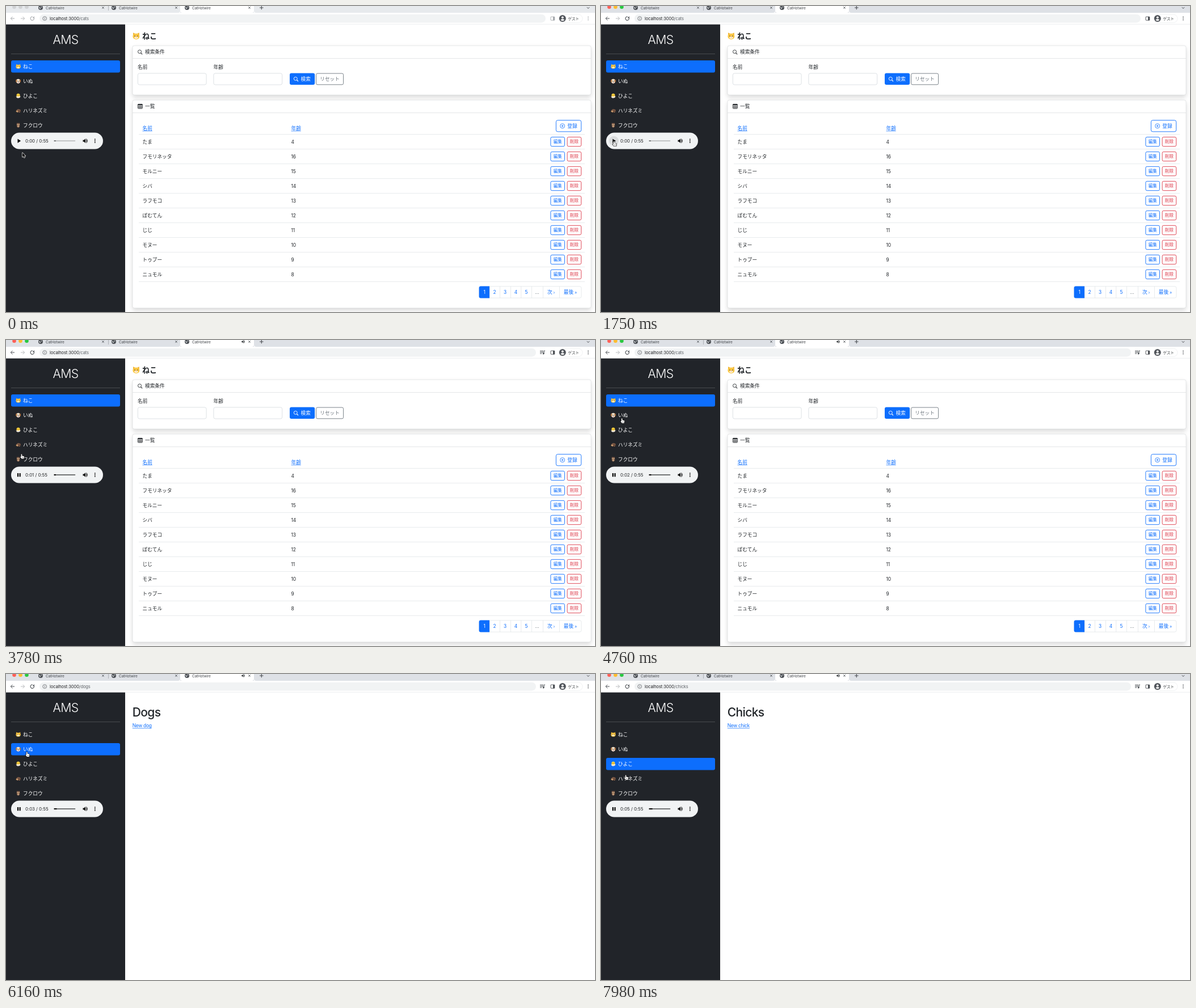
Recreate the animation shown at these times as an HTML page with a canvas. Size 1038 by 540 pixels, loop 8000 ms.

```html
<!DOCTYPE html>
<html lang="ja">
<head>
<meta charset="utf-8">
<title>AMS</title>
<style>
html, body { margin: 0; width: 100%; height: 100%; overflow: hidden; background: #fff; }
canvas { display: block; width: 1038px; height: 540px; }
</style>
</head>
<body>
<canvas id="stage"></canvas>
<script>
const W = 1038, H = 540, LOOP = 8000;
const canvas = document.getElementById('stage');
const ratio = window.devicePixelRatio || 1;
canvas.width = W * ratio;
canvas.height = H * ratio;
const c = canvas.getContext('2d');

const LATIN = 'Inter, "Noto Sans CJK JP", "Noto Sans CJK", sans-serif';
const KANA = '"Noto Sans CJK JP", "Noto Sans CJK", sans-serif';
const BLUE = '#0d6efd', RED = '#dc3545', GREY = '#6c757d', INK = '#212529', LINE = '#dee2e6';
const SIDE = '#212429', ICON = '#5f6368';
const REM = 8.64;

const MENU = ['ねこ', 'いぬ', 'ひよこ', 'ハリネズミ', 'フクロウ'];
const CATS = [
  ['たま', 4], ['フモリネッタ', 16], ['モルニー', 15], ['シバ', 14], ['ラフモコ', 13],
  ['ぽむてん', 12], ['じじ', 11], ['モヌー', 10], ['トゥプー', 9], ['ニュモル', 8]
];
const PAGES = [[834, '1'], [852, '2'], [870, '3'], [889, '4'], [907.5, '5'], [926, '…'], [946, '次 ›'], [975, '最後 »'], [1014]];

// time, x, y of the pointer
const PATH = [
  [0, 29, 259], [280, 29, 259], [560, 32, 260], [1050, 24, 243], [2900, 24, 243], [3010, 23.7, 238.7],
  [3460, 23.7, 238.7], [4270, 38, 142.5], [5180, 38, 142.5], [5390, 38, 141.7], [6400, 38, 141.7],
  [6720, 40, 160.3], [7440, 40, 160.3], [7770, 44.4, 182.5], [7860, 44.4, 182.5], [7980, 44.8, 182.5]
];
const ARROW = new Path2D('M0 0V7.6L1.8 6 3 8.8 4.3 8.2 3.1 5.6H5.5Z');
const HAND = new Path2D('M-2 .7V-3.4a.8 .8 0 0 1 1.6 0V-.9L2.6 -.4Q3.6 0 3.4 1.2L2.8 4.2H-1.2L-3.3 1.3Q-3.3 .1 -2 .7Z');

const clamp = (v, a = 0, b = 1) => Math.min(b, Math.max(a, v));
const ramp = (t, a, b) => clamp((t - a) / (b - a));

function text(s, x, y, size, color, o = {}) {
  const latin = /^[\x20-\x7e]+$/.test(s);
  const px = latin && !o.exact ? size * 0.97 : size;
  c.font = `${o.weight || 400} ${px}px ${latin ? LATIN : KANA}`;
  c.letterSpacing = `${px * (o.track ?? (latin ? -0.03 : 0))}px`;
  c.textAlign = o.align || 'left';
  c.fillStyle = color;
  c.fillText(s, x, y);
  return c.measureText(s).width;
}

function link(s, x, y, size = REM) {
  const w = text(s, x, y, size, BLUE);
  rect(x, y + 1.3, w, 0.7, BLUE);
}

function rect(x, y, w, h, color) {
  c.fillStyle = color;
  c.fillRect(x, y, w, h);
}

function box(x, y, w, h, r, fill, stroke, width = 0.7) {
  c.beginPath();
  c.roundRect(x, y, w, h, r);
  if (fill) { c.fillStyle = fill; c.fill(); }
  if (stroke) { c.strokeStyle = stroke; c.lineWidth = width; c.stroke(); }
}

function oval(x, y, rx, ry, fill, stroke, width = 1) {
  c.beginPath();
  c.ellipse(x, y, rx, ry, 0, 0, Math.PI * 2);
  if (fill) { c.fillStyle = fill; c.fill(); }
  if (stroke) { c.strokeStyle = stroke; c.lineWidth = width; c.stroke(); }
}
const dot = (x, y, r, fill, stroke, width) => oval(x, y, r, r, fill, stroke, width);

function path(d, x, y, stroke, width, fill, scale = 1) {
  const p = typeof d === 'string' ? new Path2D(d) : d;
  c.save();
  c.translate(x, y);
  c.scale(scale, scale);
  c.lineJoin = 'round';
  if (stroke) { c.strokeStyle = stroke; c.lineWidth = width; c.stroke(p); }
  if (fill) { c.fillStyle = fill; c.fill(p); }
  c.restore();
}

function dots(x, y, gap, r, color) {
  for (let i = -1; i < 2; i++) dot(x, y + i * gap, r, color);
}

function lens(x, y, color) {
  dot(x - 0.7, y - 0.7, 3, null, color, 0.9);
  path('M1.5 1.5L4 4', x, y, color, 1.1);
}

function speaker(x, y, color, s) {
  path('M-4 -1.4H-2L.6 -4V4L-2 1.4H-4Z', x, y, null, 0, color, s);
  path('M1.8 -1.9Q3.3 0 1.8 1.9M2 -3.7Q5.7 0 2 3.7', x, y, color, 1, null, s);
}

// small animal faces, drawn 9 units wide
const ANIMALS = [
  () => {
    path('M-4 .2L-3.8 -4.2 -1.5 -3 1.5 -3 3.8 -4.2 4 .2Z', 0, 0, null, 0, '#f2b632');
    oval(0, 0.6, 4.3, 3.6, '#fbc846');
    oval(0, 2, 2.2, 1.5, '#fff0cd');
    eyes(1.8, 0, 0.55);
    dot(0, 1.2, 0.5, '#d9737a');
  },
  () => {
    oval(0, 0, 3.7, 4.1, '#f3e3cb');
    oval(-3.5, -0.5, 1.1, 2.8, '#b87640');
    oval(3.5, -0.5, 1.1, 2.8, '#b87640');
    oval(0, 2.4, 1.9, 1.6, '#fff8ec');
    eyes(1.5, -0.5, 0.55);
    oval(0, 1.4, 0.9, 0.65, '#2a211d');
    oval(0, 3.2, 0.6, 0.7, '#e45f66');
  },
  () => {
    dot(0, -1, 3.2, '#ffd43c');
    path('M-4.2 .4L-2.5 1.5 -1 .4 .6 1.5 2.2 .4 4.2 .8Q3.6 4.2 0 4.2T-4.2 .4Z', 0, 0, null, 0, '#f2e9d9');
    eyes(1.3, -1.4, 0.45);
    oval(0, -0.5, 0.9, 0.5, '#f18a24');
  },
  () => {
    oval(0.5, 0.3, 4, 3, '#67493a');
    for (let i = 0; i < 7; i++) path('M-.6 0L.5 -2 .8 0Z', -1.8 + i * 0.85, -1.5 + Math.abs(i - 2) * 0.4, null, 0, '#82604b');
    oval(-2.2, 1.3, 2.2, 1.4, '#d6a676');
    dot(-4.2, 1.2, 0.5, '#211916');
    dot(-2.5, 0.8, 0.4, '#211916');
    rect(-2, 2.7, 1.3, 0.8, '#c09068');
    rect(1.8, 2.7, 1.3, 0.8, '#c09068');
  },
  () => {
    oval(0, 0, 3, 4.2, '#765443');
    path('M-3 -2.3L-2.5 -4.5 0 -3.4 2.5 -4.5 3 -2.3Z', 0, 0, null, 0, '#765443');
    oval(0, 1.7, 1.8, 2.2, '#b99779');
    dot(-1.3, -1.6, 1.15, '#e6c5a0');
    dot(1.3, -1.6, 1.15, '#e6c5a0');
    eyes(1.2, -1.6, 0.5);
    path('M-.5 -1L.5 -1 0 .2Z', 0, 0, null, 0, '#e9a236');
  }
];
function eyes(dx, y, r) {
  dot(-dx, y, r, '#35291f');
  dot(dx, y, r, '#35291f');
}
function animal(i, x, y, s = 1) {
  c.save();
  c.translate(x, y);
  c.scale(s, s);
  ANIMALS[i]();
  c.restore();
}

function tab(x, active) {
  if (active) {
    box(x - 10, -8, 130, 20, 4, '#fff');
    path('M-4 0Q0 0 0 -4L0 0ZM134 0Q130 0 130 -4V0Z', x - 10, 12, null, 0, '#fff');
  }
  dot(x + 2, 3, 4, '#4d5156');
  path('M-3 -1.4Q-1 -.2 0 .2L-.6 2.6Q-2.6 2 -3 -1.4ZM.4 -2.6L2.3 -1.6 1.8 .4Z', x + 2, 3, null, 0, '#d5d8dc');
  text('CatHotwire', x + 11, 5.5, 6.7, '#45494d');
  path('M-1.8 -1.8L1.8 1.8M1.8 -1.8L-1.8 1.8', x + 112, 3, '#45494d', 0.8);
}

function browser(t) {
  const focused = t >= 1400, playing = t >= 2240;
  rect(0, 0, W, 12, focused ? '#dee1e6' : '#e7eaed');
  const lights = focused ? ['#fe5f57', '#febc2e', '#28c840'] : ['#d0d2d4', '#d0d2d4', '#d0d2d4'];
  lights.forEach((color, i) => dot(14.5 + i * 11, 1.8, 3.3, color));
  rect(0, 12, W, 20, '#fff');
  tab(59); tab(188); tab(317, true);
  rect(180, -1, 0.7, 9, '#9a9da2');
  c.globalAlpha = ramp(t, 2870, 3290);
  speaker(418, 3, '#3c4043', 0.7);
  c.globalAlpha = 1;
  path('M-3.3 0H3.3M0 -3.3V3.3', 450.3, 3, '#45494d', 1.1);
  path('M-2.2 -1.1L0 1.1 2.2 -1.1', 1026, 3.3, '#45494d', 1);

  const ink = focused ? '#4b4f54' : '#a7aaae';
  const arrow = 'M3.5 0H-3.2M0 -3.2L-3.2 0 0 3.2';
  path(arrow, 11.5, 22, ink, 1);
  c.save();
  c.translate(29.5, 22); c.scale(-1, 1);
  path(arrow, 0, 0, '#b8babd', 1);
  c.restore();
  c.beginPath();
  c.arc(46.3, 22, 3.2, -0.6, 4.9);
  c.strokeStyle = ink; c.lineWidth = 1.1; c.stroke();
  path('M3.5 -4V-.7H.2Z', 46.3, 22, null, 0, ink);

  box(59, 14.7, (playing ? 934 : 951) - 59, 14.8, 7.4, '#f1f3f4');
  dot(68.2, 22, 3.4, null, ICON, 0.8);
  rect(67.8, 21.4, 0.8, 2.4, ICON);
  rect(67.8, 20, 0.8, 0.8, ICON);
  const page = t < 6020 ? '/cats' : t < 7140 ? '/dogs' : '/chicks';
  const host = text('localhost:3000', 77, 24.8, 7.5, '#202124', { exact: 1, track: -0.012 });
  text(page, 77 + host, 24.8, 7.5, ICON, { exact: 1, track: -0.012 });

  if (playing) {
    path('M-4.5 -2.7H1.5M-4.5 -.4H1.5M-4.5 1.9H-1M2.6 2V-2.9H4.6', 945.5, 22, '#4b4f54', 1);
    dot(947.2, 24, 1.4, '#4b4f54');
  }
  box(960, 19, 6.8, 6.2, 0.7, null, ink, 0.9);
  rect(964, 19, 3, 6.2, ink);
  box(974, 15, 42, 14.3, 7.2, '#fff', '#e6e8ea', 0.6);
  dot(980.8, 22, 6, '#50545a');
  dot(980.8, 20.2, 1.9, '#fff');
  path('M-3.4 2.4Q0 -.8 3.4 2.4 2 4.2 0 4.2T-3.4 2.4Z', 980.8, 22, null, 0, '#fff');
  text('ゲスト', 990.5, 24.6, 6.5, '#3c4043');
  dots(1026, 22, 2.6, 0.8, ink);
  rect(0, 31.8, W, 0.6, '#dfe1e4');
}

function audio(t) {
  const playing = t >= 2240;
  box(9, 223.5, 162, 29, 14.5, '#f1f3f4');
  const hover = ramp(t, 1080, 1260) * (1 - ramp(t, 3500, 3640));
  if (hover) dot(22.5, 238, 8.6 * hover, `rgba(0,0,0,${0.09 * hover})`);
  if (playing) {
    rect(20, 235, 2.1, 6.3, '#000');
    rect(23.6, 235, 2.1, 6.3, '#000');
  } else path('M-2.3 -3.6L3.3 0 -2.3 3.6Z', 22.8, 238.1, null, 0, '#000');

  const sec = Math.max(0, (t - 2760) / 990);
  text(`0:0${Math.floor(sec)} / 0:55`, 34, 241, 7.9, '#26282a', { exact: 1, track: -0.005 });
  box(84.5, 237.1, 37.8, 1.9, 1, '#c2c4c5');
  box(84.5, 237.1, t < 3290 ? 3.5 : 37.8, 1.9, 1, '#727475');
  if (playing) box(84.5, 237.1, 2.8 + sec * 0.68, 1.9, 1, '#000');
  speaker(139.5, 238, '#111', 1);
  dots(156.8, 238, 2.8, 0.95, '#111');
}

function sidebar(t, active) {
  rect(0, 32.3, 210, H, SIDE);
  text('AMS', 105, 67, 21.9, '#fff', { weight: 300, align: 'center' });
  rect(9, 84.3, 192, 0.7, '#5a5d61');
  box(9, 96 + active * 26, 192, 21.5, 3, BLUE);
  MENU.forEach((name, i) => {
    const y = 106.6 + i * 26;
    animal(i, 21.6, y, 0.95);
    text(name, 30, y + 3.2, REM, '#fff');
  });
  audio(t);
}

function card(y, h, title) {
  c.save();
  c.shadowColor = 'rgba(0,0,0,.15)';
  c.shadowBlur = 8.6 * ratio;
  c.shadowOffsetY = 4.3 * ratio;
  box(223, y, 808, h, 3.2, '#fff');
  c.restore();
  box(223, y, 808, h, 3.2, null, '#d5d7d9', 0.6);
  rect(223, y + 22, 808, 0.7, '#d9dbdd');
  text(title, 245, y + 14.4, REM, INK);
}

function button(s, x, y, w, h, color, size = REM, fill) {
  box(x, y, w, h, 2.4, fill, color, 0.9);
  text(s, x + w / 2, y + h / 2 + size * 0.37, size, fill ? '#fff' : color, { align: 'center' });
}

function catPage() {
  animal(0, 229.4, 53, 1.4);
  text('ねこ', 240, 57.8, 13.1, INK, { weight: 700 });

  card(70, 87, '検索条件');
  lens(236.2, 81.3, INK);
  [['名前', 232], ['年齢', 365.6]].forEach(([name, x]) => {
    text(name, x, 110.8, REM, INK);
    box(x + 0.3, 118.8, 120.8, 20.2, 3, '#fff', '#ced4da');
  });
  box(500, 118.6, 44.2, 20.5, 3, BLUE);
  lens(511, 129, '#fff');
  text('検索', 519.5, 132.2, REM, '#fff');
  button('リセット', 546.6, 119, 48, 19.8, GREY);

  card(166, 367, '一覧');
  box(232.4, 173.2, 8, 7.8, 1, null, INK, 0.8);
  rect(232.4, 173.2, 8, 2, INK);
  path('M-4 .5H4M-4 2.3H4M-1.4 -2V4M1.4 -2V4', 236.4, 177, INK, 0.7);

  link('名前', 240.5, 218.7);
  link('年齢', 502.5, 218.7);
  box(969.4, 201.6, 44.3, 20.2, 3, null, BLUE, 0.9);
  dot(980.6, 211.7, 4, null, BLUE, 0.8);
  path('M-2 0H2M0 -2V2', 980.6, 211.7, BLUE, 0.8);
  text('登録', 989.3, 214.9, REM, BLUE);

  rect(234, 226, 786, 0.7, LINE);
  CATS.forEach(([name, age], i) => {
    const y = 239.5 + i * 26;
    text(name, 240.5, y + 3.2, REM, INK);
    text(String(age), 502.5, y + 3.1, REM, INK);
    button('編集', 959.9, y - 8.2, 24.6, 16.4, BLUE, 7.56);
    button('削除', 989.1, y - 8.2, 24.6, 16.4, RED, 7.56);
    rect(234, y + 12.6, 786, 0.7, LINE);
  });

  box(834, 494.8, 180, 20.4, 3, '#fff', LINE);
  PAGES.slice(0, -1).forEach(([x, s], i) => {
    const end = PAGES[i + 1][0];
    if (i) rect(x, 494.8, 0.7, 20.4, LINE);
    else box(x - 0.4, 494.5, end - x + 0.4, 21, [3, 0, 0, 3], BLUE);
    const color = i === 0 ? '#fff' : i === 5 ? GREY : BLUE;
    if (i === 5) [-2.4, 0, 2.4].forEach(d => dot((x + end) / 2 + d, 507.5, 0.6, GREY));
    else text(s, (x + end) / 2, 508.2, REM, color, { align: 'center' });
  });
}

function simplePage(title, action) {
  text(title, 222.7, 75.4, 21.7, INK, { weight: 500 });
  link(action, 222.8, 94.2);
}

function pointer(t) {
  let i = 0;
  while (i < PATH.length - 2 && t >= PATH[i + 1][0]) i++;
  const [a, x0, y0] = PATH[i], [b, x1, y1] = PATH[i + 1];
  const k = ramp(t, a, b), e = k * k * (3 - 2 * k);
  const x = x0 + (x1 - x0) * e, y = y0 + (y1 - y0) * e;
  if (t < 1050) path(ARROW, x, y, '#fff', 1.3, '#000');
  else {
    path(HAND, x, y, '#111', 1.3, '#fff');
    path('M-.3 1.2V3M1 1.2V3M2.2 1.2V3', x, y, '#333', 0.45);
  }
}

function draw(now) {
  const t = now % LOOP;
  const active = t < 6160 ? 0 : t < 7210 ? 1 : 2;
  c.setTransform(ratio, 0, 0, ratio, 0, 0);
  rect(0, 0, W, H, '#fff');
  if (active === 0) catPage();
  else if (active === 1) simplePage('Dogs', 'New dog');
  else simplePage('Chicks', 'New chick');
  sidebar(t, active);
  browser(t);
  pointer(t);
}

const start = performance.now();
function tick() {
  draw(performance.now() - start);
  requestAnimationFrame(tick);
}
tick();
</script>
</body>
</html>
```
